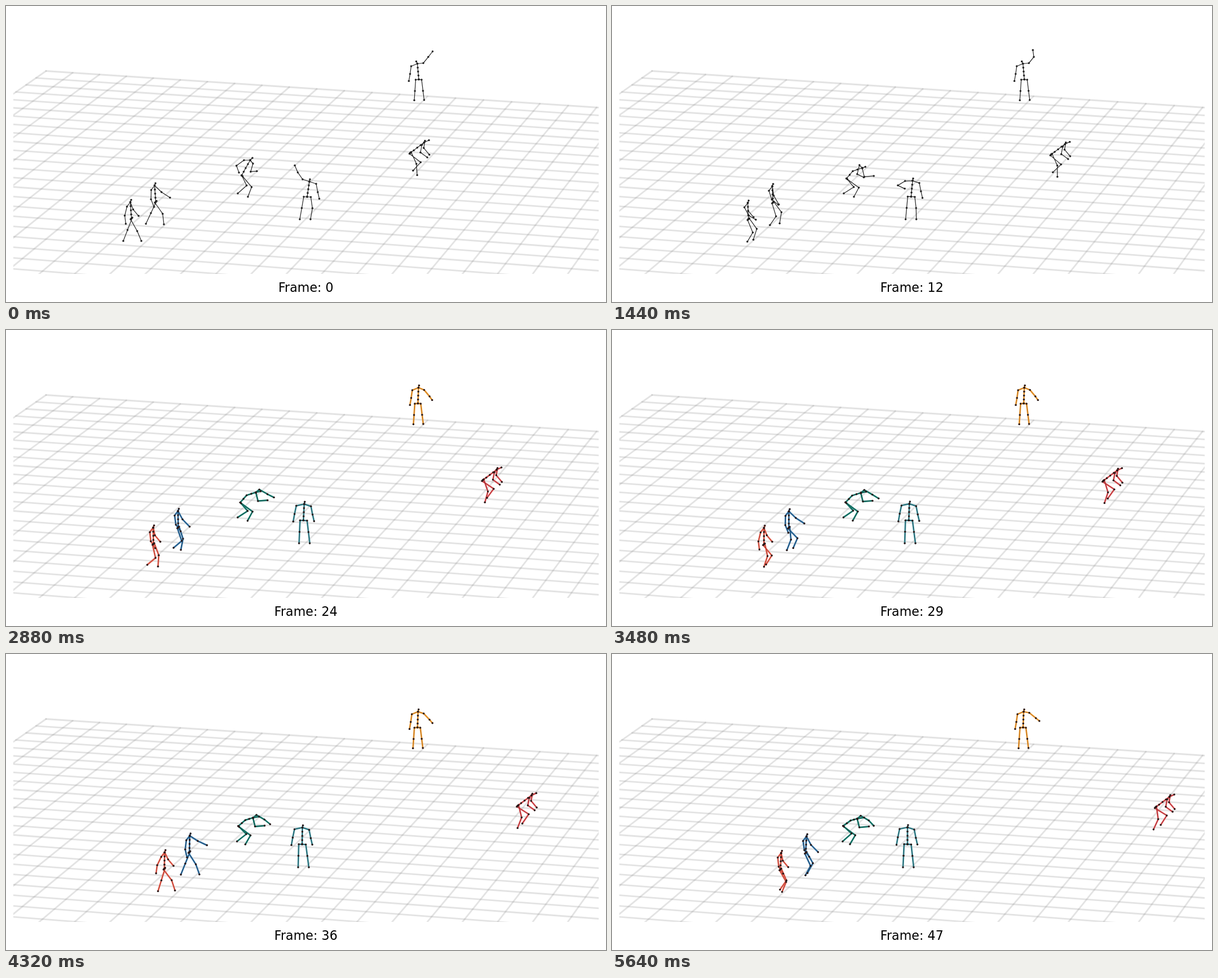
Write an HTML page with a canvas that moves like this. It is 1064 px wide and 526 px high and loops after 5.76 s.

```html
<!DOCTYPE html>
<html lang="en">
<head>
<meta charset="utf-8">
<title>Skeletons</title>
<style>
  html, body { margin: 0; width: 100%; height: 100%; overflow: hidden; background: #fff; }
  canvas { display: block; }
</style>
</head>
<body>
<canvas id="stage" width="1064" height="526"></canvas>
<script>
const ctx = document.getElementById('stage').getContext('2d');
const STEP = 120, COUNT = 48, SWITCH = 24, TAU = Math.PI * 2;

const lerp = (a, b, k) => a + (b - a) * k;
const mix = (p, q, k) => [lerp(p[0], q[0], k), lerp(p[1], q[1], k)];
const add = (p, x, y) => [p[0] + x, p[1] + y];

// Smooth step from 0 to 1 while f runs from a to b
function ramp(f, a, b) {
  const k = Math.min(1, Math.max(0, (f - a) / (b - a)));
  return k * k * (3 - 2 * k);
}

// Angles in degrees: 0 hangs down, 90 points right, 180 points up
function polar(p, len, deg) {
  const a = deg * TAU / 360;
  return add(p, len * Math.sin(a), len * Math.cos(a));
}

function arm(root, upper, fore, upperLen, foreLen) {
  const elbow = polar(root, upperLen, upper);
  return [root, elbow, polar(elbow, foreLen, fore)];
}

// Two bones from hip to foot, the knee bends to the right
function leg(hip, foot, thigh, shin) {
  const dx = foot[0] - hip[0], dy = foot[1] - hip[1], d = Math.hypot(dx, dy);
  const along = (thigh ** 2 - shin ** 2 + d * d) / (2 * d);
  const bend = Math.sqrt(Math.max(0, thigh ** 2 - along ** 2));
  return [hip, add(hip, (dx * along + dy * bend) / d, (dy * along - dx * bend) / d), foot];
}

function walker({ x, y, speed, start, feet, left, right, reach }) {
  const CYCLE = 38;
  return f => {
    const s = Math.sin(TAU * (f - 4) / 42);
    const pelvis = [x + speed * f, y + 0.11 * f];
    const head = add(pelvis, -0.5 + 0.07 * f, -33), neck = add(head, -1.5, 4);
    const foot = n => {
      const p = (f - start) / CYCLE - n / 2, turn = Math.floor(p);
      const q = Math.min(1, (p - turn) * 2);
      return [feet[n] + speed * CYCLE * (turn + ramp(q, 0, 1)),
              y + 40 + 0.11 * f - 4 * Math.sin(Math.PI * q)];
    };
    const swing = ([mid, amp]) => mid + amp * s;
    return {
      head, neck, pelvis,
      arms: [
        arm(add(neck, -6, 8), ...left.map(swing), 16.5, 14.5),
        arm(neck, ...right.map(swing), reach, reach + 1)
      ],
      legs: [
        leg(add(pelvis, 1.5, -1.5), foot(0), 23, 20),
        leg(add(pelvis, -1.5, 1.5), foot(1), 24, 19)
      ]
    };
  };
}

function runner(f) {
  const late = f >= SWITCH;
  const pelvis = [717 + 5.15 * f + (late ? 5 : 0), 261 + 0.24 * f];
  const neck = add(pelvis, 24.5, -18.5);
  const stride = (late ? 1 : 5) * Math.cos(TAU * (f - 12) / 14);
  return {
    pelvis, neck, head: add(pelvis, 33, -22.5),
    arms: [
      arm(add(pelvis, 20.5, -14), -11, 54, 13.5, 15),
      arm(add(pelvis, 26, -21.5), -10, 40, 13, 15.5)
    ],
    legs: [
      leg(add(pelvis, 1.5, -1.5), add(pelvis, 9 - 0.25 * f + stride, 39.5), 23, 20),
      leg(add(pelvis, -1.5, 1.5), add(pelvis, 8 - stride, 31.5), 25, 20)
    ]
  };
}

// Lowers a raised arm, then settles to the left
function stander(f) {
  const e = 1 - (1 - f / 47) ** 1.5, settle = -5 * (f / 47) ** 2;
  const down = ramp(f, 0, 20);
  const pelvis = [534 - 10 * e, 339 - e];
  const neck = add(pelvis, 4 * (1 - e), -27 - 3 * e);
  return {
    pelvis, neck, head: add(neck, 1, -4),
    arms: [
      arm(add(neck, -12 - 2 * down, lerp(-4, 3, down)),
          lerp(-145, -12, down), lerp(203, -10, down), 15, 13.5),
      arm(add(neck, 12, 4), 11, 13, 15, 12)
    ],
    legs: [
      leg(add(pelvis, -6, 0), [521 + settle, 379], 20, 20),
      leg(add(pelvis, 6.5, 0.5), [540 + settle, 379], 20, 20)
    ]
  };
}

function waver(f) {
  const late = f >= SWITCH, q = f / 47;
  const pelvis = [732 - 3 * q, 130.5];
  const neck = add(pelvis, late ? 1 : -2.5, -28);
  const rise = ramp(f, 29, 47), drop = ramp(f, 12, 19);
  const wave = Math.cos(TAU * (f - 11) / 20);
  const raised = late
    ? arm(add(neck, 10, 4 - 2 * rise), 40 + 11 * rise, 35 + 16 * rise, 15, 8)
    : arm(add(neck, 10.5, -1 + drop), 141 - 31 * drop, 165 + 24 * wave, 14 + 3 * drop, 12.5);
  return {
    pelvis, neck, head: add(neck, late ? 1 : -2, -4),
    arms: [arm(add(neck, -11, 4.5), -8, -10, 14, 12.5), raised],
    legs: [
      leg(add(pelvis, -5.5, 0.5), [724 - 3 * q, 167.5], 19.5, 16),
      leg(add(pelvis, 5, 0.5), [741.5 - 3 * q, 167], 19.5, 16)
    ]
  };
}

function bender(f) {
  const bow = ramp(f, 0, 13), reach = ramp(f, 4, 24), drift = ramp(f, 19, 47);
  const pelvis = [lerp(418, 416, bow) - 6 * drift, lerp(301, 306.5, bow) - drift];
  const neck = add(pelvis, lerp(15, 28, bow) - 3 * drift, lerp(-27, -18.5, bow) + 5.5 * drift);
  return {
    pelvis, neck,
    head: add(neck, 4 + 4 * reach + 4 * drift, -4 + 2 * bow),
    mid: add(pelvis, 7 + 4 * bow + 2 * drift, -13 + 3.5 * drift),
    arms: [
      arm(add(neck, lerp(-11, 6, reach), -5 * bow), lerp(-54, 60, reach), lerp(20, 65, bow) - 22 * drift, 16.5, 13),
      arm(add(neck, 5 - 5 * bow, 6 - 5 * bow), lerp(-16, 14, bow), 95, 15, lerp(11, 17, bow))
    ],
    legs: [
      leg(pelvis, [411 - 2 * drift, 333], 20, 21),
      leg(add(pelvis, 1.5, 1.5), [429 - 7 * drift, 339 - drift], 25, 18.5)
    ]
  };
}

const figures = [
  { color: '#f0705f', core: '#a02c22', pose: walker({
    x: 222.5, y: 377.5, speed: 1.62, start: 0, feet: [208, 240],
    left: [[2, 28], [27, 35]], right: [[14, -12], [40, 0]], reach: 14
  }) },
  { color: '#3a7cb0', core: '#173c5c', pose: walker({
    x: 265.5, y: 348, speed: 1.66, start: -1.5, feet: [247, 280],
    left: [[6, 13], [33, 20]], right: [[32, -25], [47, -18]], reach: 17
  }) },
  { color: '#1f8a7c', core: '#0b423c', pose: bender },
  { color: '#469aa6', core: '#1a4c54', pose: stander },
  { color: '#f8a53c', core: '#a8661a', pose: waver },
  { color: '#ec6466', core: '#8c1f24', pose: runner }
];

function stroke(lines, color, width) {
  ctx.beginPath();
  for (const line of lines) line.forEach((p, i) => i ? ctx.lineTo(...p) : ctx.moveTo(...p));
  ctx.strokeStyle = color;
  ctx.lineWidth = width;
  ctx.stroke();
}

function drawFigure({ color, core, pose }, f) {
  const { head, neck, pelvis, arms, legs, mid = mix(neck, pelvis, 0.5) } = pose(f);
  const lines = [
    [head, neck, mix(neck, mid, 0.5), mid, mix(mid, pelvis, 0.5), pelvis],
    ...arms.map(a => [neck, ...a]),
    ...legs.map(l => [pelvis, ...l])
  ];
  const tinted = f >= SWITCH;
  if (tinted) stroke(lines, color, 2.8);
  stroke(lines, tinted ? core : '#222', tinted ? 0.9 : 1.2);
  ctx.fillStyle = tinted ? '#2a1a1a' : '#222';
  for (const [x, y] of lines.flat()) {
    ctx.beginPath();
    ctx.arc(x, y, 1.75, 0, TAU);
    ctx.fill();
  }
}

// Floor in perspective: each family of lines meets in its own far point
const CORNER = [71, 115.5], FAR_ROW = [-28900, -1806], FAR_COL = [2423, -1531];

function drawGrid() {
  const line = (far, edge, rate, n) => {
    const p = mix(edge, CORNER, 1 / (1 - rate * n));
    stroke([[p, mix(far, p, 1.5)]], 'rgba(128,128,128,.22)', 2.8);
  };
  ctx.save();
  ctx.beginPath();
  ctx.rect(13, 13, 1038, 463);
  ctx.clip();
  for (let n = 0; n < 32; n++) {
    line(FAR_ROW, FAR_COL, 0.0074, n);
    line(FAR_COL, FAR_ROW, 0.00163, n);
  }
  ctx.restore();
}

function draw() {
  const frame = Math.floor(performance.now() / STEP) % COUNT;
  ctx.fillStyle = '#fff';
  ctx.fillRect(0, 0, 1064, 526);
  ctx.lineCap = ctx.lineJoin = 'round';
  drawGrid();
  for (const fig of figures) drawFigure(fig, frame);
  ctx.fillStyle = '#000';
  ctx.font = '22.2px "DejaVu Sans", sans-serif';
  ctx.textAlign = 'center';
  ctx.fillText('Frame: ' + frame, 531.8, 508);
  requestAnimationFrame(draw);
}
draw();
</script>
</body>
</html>
```
